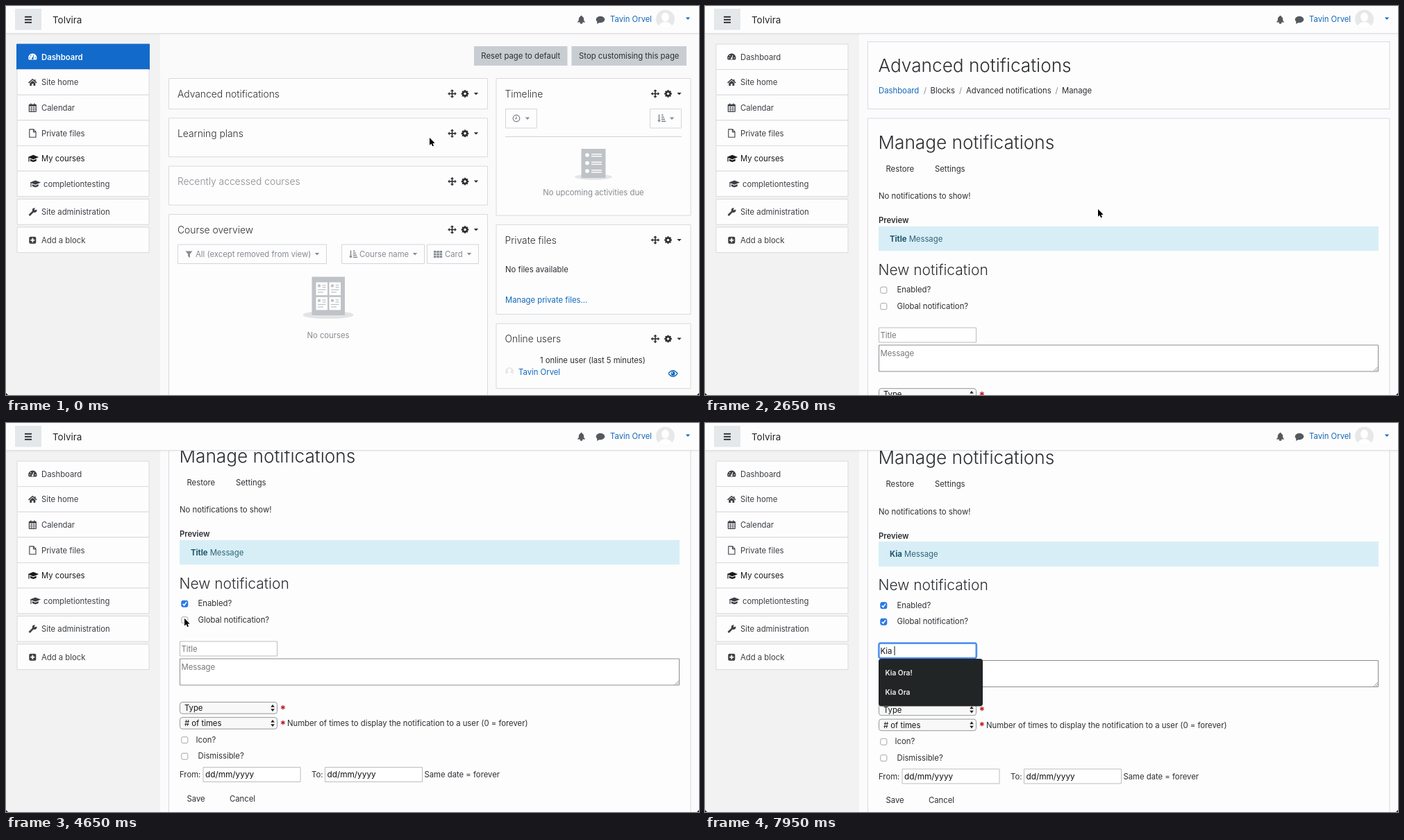
Write an HTML page with a canvas that moves like this. It is 998x561 px and loops after 8000 ms.

```html
<!DOCTYPE html>
<html lang="en">
<head>
<meta charset="utf-8">
<title>Manage notifications</title>
<style>
html, body { margin: 0; width: 100%; height: 100%; overflow: hidden; background: #fbfbfd; }
canvas { display: block; width: 998px; height: 561px; }
</style>
</head>
<body>
<canvas id="stage"></canvas>
<script>
const W = 998, H = 561, LOOP = 8000;
const canvas = document.getElementById('stage');
const g = canvas.getContext('2d');
const ratio = window.devicePixelRatio || 1;
canvas.width = W * ratio;
canvas.height = H * ratio;

const INK = '#2b2e31', GREY = '#868b90', BLUE = '#1268b8', LINE = '#d9dadd';
const CARD = '#fdfdfe', PAGE = '#fafafb';
const BODY = 11.3, HEAD = 13.85, SUB = 21, TITLE = 26.2;
const SITE = 'Tolvira', USER = 'Tavin Orvel';

// ---- drawing helpers ----
function text(s, x, y, color = INK, size = BODY, weight = 400, align = 'left') {
  g.font = `${weight} ${size}px Inter, "Open Sans", sans-serif`;
  g.textAlign = align;
  g.fillStyle = color;
  g.fillText(s, x, y + size * 0.36);
  return g.measureText(s).width;
}
function rect(x, y, w, h, color) {
  g.fillStyle = color;
  g.fillRect(x, y, w, h);
}
function box(x, y, w, h, fill, stroke, r = 0, lw = 1) {
  g.beginPath();
  g.roundRect(x, y, w, h, r);
  if (fill) { g.fillStyle = fill; g.fill(); }
  if (stroke) { g.strokeStyle = stroke; g.lineWidth = lw; g.stroke(); }
}
function trace(x, y, pts) {
  g.beginPath();
  for (let i = 0; i < pts.length; i += 2) g.lineTo(x + pts[i], y + pts[i + 1]);
}
function poly(x, y, color, ...pts) {
  trace(x, y, pts);
  g.fillStyle = color;
  g.fill();
}
function path(x, y, color, lw, ...pts) {
  trace(x, y, pts);
  g.strokeStyle = color;
  g.lineWidth = lw;
  g.stroke();
}
function oval(x, y, rx, ry, color) {
  g.beginPath();
  g.ellipse(x, y, rx, ry, 0, 0, 7);
  g.fillStyle = color;
  g.fill();
}
function ring(x, y, r, color, lw) {
  g.beginPath();
  g.arc(x, y, r, 0, 7);
  g.strokeStyle = color;
  g.lineWidth = lw;
  g.stroke();
}
function clipped(x, y, w, h, draw) {
  g.save();
  g.beginPath();
  g.rect(x, y, w, h);
  g.clip();
  draw();
  g.restore();
}
function focusRing(x, y, w, h, fill) {
  box(x, y, w, h, fill, '#a9cbfa', 3, 3.2);
  box(x, y, w, h, null, '#3f86ee', 2, 1.8);
}

// ---- timing helpers ----
const ease = k => k * k * (3 - 2 * k);
function track(keys, t) {
  if (t <= keys[0][0]) return keys[0].slice(1);
  for (let i = 1; i < keys.length; i++) {
    const a = keys[i - 1], b = keys[i];
    if (t < b[0]) {
      const k = ease((t - a[0]) / (b[0] - a[0]));
      return a.slice(1).map((v, j) => v + (b[j + 1] - v) * k);
    }
  }
  return keys[keys.length - 1].slice(1);
}
const between = (t, a, b) => t >= a && t < b;

const LOAD = 1650, CHECK_1 = 4300, CHECK_2 = 4850, FOCUS = 5500;
const KEYS = [6900, 7150, 7400, 7700], TYPED = 'Kia ';
const POINTER = [
  [0, 610, 190], [550, 661, 128], [900, 661, 128], [1300, 567, 151], [1500, 567, 151],
  [2100, 555, 177.5], [2600, 566, 293], [3400, 567, 293], [3650, 342, 281],
  [4150, 257, 261], [4450, 257, 261], [4700, 257, 284], [5000, 257, 284], [5400, 304, 324]
];
const SCROLL = [[2700, 0], [3100, 68.5], [3500, 147], [3650, 147.5], [4000, 149], [5900, 149], [6200, 146.5]];

// ---- icons, centred on x, y ----
const caret = (x, y, c = INK) => poly(x, y, c, -3.2, -1.6, 3.2, -1.6, 0, 1.7);
function moveIcon(x, y) {
  path(x, y, INK, 1.6, -4, 0, 4, 0);
  path(x, y, INK, 1.6, 0, -4, 0, 4);
  for (const [a, b] of [[1, 0], [-1, 0], [0, 1], [0, -1]])
    poly(x, y, INK, a * 6.3, b * 6.3, a * 3.6 + b * 2.6, b * 3.6 + a * 2.6, a * 3.6 - b * 2.6, b * 3.6 - a * 2.6);
}
function gear(x, y) {
  for (let i = 0; i < 4; i++) {
    const a = i * Math.PI / 4, c = Math.cos(a) * 5.3, s = Math.sin(a) * 5.3;
    path(x, y, INK, 2.4, -c, -s, c, s);
  }
  oval(x, y, 4.1, 4.1, INK);
  oval(x, y, 1.8, 1.8, CARD);
}
function tools(x, y) {
  moveIcon(x, y);
  gear(x + 18.5, y);
  caret(x + 34.5, y);
}
function sortIcon(x, y) {
  path(x, y, GREY, 1.5, -3.5, -5.5, -3.5, 4);
  poly(x, y, GREY, -6, 2.5, -1, 2.5, -3.5, 5.8);
  [2.5, 3.8, 5, 6.2].forEach((w, i) => rect(x, y - 5.5 + i * 3, w, 1.6, GREY));
}
function clockIcon(x, y) {
  ring(x, y, 4.7, GREY, 1.4);
  path(x, y, GREY, 1.2, 0, -2.8, 0, 0.6, -2, 0.6);
}
function gridIcon(x, y) {
  for (let i = 0; i < 9; i++) rect(x - 6 + i % 3 * 4.3, y - 5 + Math.floor(i / 3) * 3.6, 3.5, 2.8, GREY);
}
function avatar(x, y, r) {
  oval(x, y, r, r, '#e7e8ea');
  g.save();
  g.beginPath();
  g.arc(x, y, r, 0, 7);
  g.clip();
  oval(x, y - r * 0.22, r * 0.4, r * 0.48, '#fff');
  oval(x, y + r * 0.9, r * 0.75, r * 0.6, '#fff');
  g.restore();
}
function eye(x, y) {
  g.beginPath();
  g.moveTo(x - 6.5, y);
  g.quadraticCurveTo(x, y - 8.5, x + 6.5, y);
  g.quadraticCurveTo(x, y + 8.5, x - 6.5, y);
  g.strokeStyle = BLUE;
  g.lineWidth = 1.3;
  g.stroke();
  oval(x, y, 2.9, 2.9, BLUE);
  oval(x - 1, y - 1, 0.9, 0.9, '#fff');
}
const navIcons = {
  dash(x, y, c, bg) {
    g.beginPath();
    g.arc(x, y + 1, 6.2, Math.PI * 0.85, Math.PI * 2.15);
    g.closePath();
    g.fillStyle = c;
    g.fill();
    path(x, y, bg, 1.1, 0, 2.5, 1.6, -2.5);
    oval(x, y + 2, 1.4, 1.4, bg);
    for (const [a, b] of [[-4, 1], [-2.6, -2], [4, 1]]) oval(x + a, y + b, 0.8, 0.8, bg);
  },
  home(x, y, c) {
    path(x, y, c, 1.4, -5.8, 0.6, 0, -4.5, 5.8, 0.6);
    poly(x, y, c, -4, 0.8, 0, -2.6, 4, 0.8, 4, 4.7, 1.2, 4.7, 1.2, 1.6, -1.2, 1.6, -1.2, 4.7, -4, 4.7);
    rect(x + 2.8, y - 4.4, 1.4, 3, c);
  },
  cal(x, y, c) {
    box(x - 5, y - 4.5, 10, 10, null, c, 0.5, 1.1);
    rect(x - 5, y - 4.5, 10, 2.2, c);
    for (const d of [-1.7, 1.7]) path(x, y, c, 0.7, d, -2, d, 5.5);
    for (const d of [0.2, 2.8]) path(x, y, c, 0.7, -5, d, 5, d);
    rect(x - 3.3, y - 6.3, 1.6, 2.6, c);
    rect(x + 1.7, y - 6.3, 1.6, 2.6, c);
  },
  file(x, y, c) {
    path(x, y, c, 1.1, -4.5, -5.7, 1.3, -5.7, 4.7, -2.2, 4.7, 5.7, -4.5, 5.7, -4.5, -6.2);
    path(x, y, c, 1.1, 1.2, -5.7, 1.2, -2, 4.7, -2);
  },
  cap(x, y, c) {
    poly(x, y, c, -6.8, -2.2, 1, -5.4, 8.8, -2.2, 1, 1);
    poly(x, y, c, -3.4, 0.3, 1, 2.2, 5.4, 0.3, 5.4, 3.2, 1, 4.8, -3.4, 3.2);
    path(x, y, c, 1.2, -5.3, -2, -5.3, 4.2);
  },
  wrench(x, y, c, bg) {
    path(x, y, c, 2.6, -4.8, 4.8, 2, -2);
    oval(x + 2.8, y - 2.6, 3.3, 3.3, c);
    poly(x, y, bg, 2.2, -2.8, 4, -7, 7.2, -4);
  },
  plus(x, y, c, bg) {
    box(x - 5, y - 5, 10, 10, c, null, 2);
    path(x, y, bg, 1.8, -3, 0, 3, 0);
    path(x, y, bg, 1.8, 0, -3, 0, 3);
  }
};

// ---- page frame ----
const NAV = [
  ['Dashboard', 'dash', 55], ['Site home', 'home', 91.6], ['Calendar', 'cal', 128.2],
  ['Private files', 'file', 164.9], ['My courses', 'cap', 201.5], ['completiontesting', 'cap', 238.1],
  ['Site administration', 'wrench', 278.5], ['Add a block', 'plus', 319]
];
function drawer(active) {
  rect(0, 40, 222, H - 40, '#f2f2f2');
  NAV.forEach(([label, icon, y], i) => {
    const on = active && i === 0, bg = on ? '#126acb' : CARD;
    const dx = i === 5 ? 3 : 0, c = on ? '#fff' : i === 4 ? '#17191b' : '#3b3f43';
    box(on ? 15.5 : 16, y, on ? 191 : 190, 36.6, bg, on ? bg : LINE);
    navIcons[icon](38.3 + dx, y + 18.7, c, bg);
    text(label, 51 + dx, y + 18.6, c, BODY, on ? 600 : 400);
  });
}
function topBar() {
  rect(0, 0, W, 39, CARD);
  rect(0, 39, W, 1, '#dcdcde');
  rect(0, 40, W, 2, 'rgba(0,0,0,.025)');
  rect(13, 4, 38, 30.5, '#e4e8eb');
  for (const y of [15, 19, 23]) rect(27, y - 0.2, 10, 1.8, '#1f2224');
  text(SITE, 67, 20, '#1f2224', 13.4);
  const c = '#55595d';
  poly(828.5, 19.5, c, -5.8, 4, -3.8, 1.5, -3.4, -2.5, -1, -5, 0, -6, 1, -5, 3.4, -2.5, 3.8, 1.5, 5.8, 4);
  oval(828.5, 24.2, 1.8, 1.6, c);
  oval(856, 19.5, 6.3, 4.7, c);
  poly(856, 19.5, c, -4.5, 2, -5, 6.3, 0, 4);
  text(USER, 870, 19, BLUE);
  avatar(949.5, 19, 13.5);
  caret(982, 18, BLUE);
}

// ---- dashboard ----
function card(x, y, w, h, title, color) {
  box(x, y, w, h, CARD, LINE);
  text(title, x + 12.5, y + 22.2, color || INK, HEAD, 300);
  tools(x + w - 51, y + 22);
}
function outline(x, y, w, h = 27.5) {
  box(x, y, w, h, CARD, '#d3d6d9');
  caret(x + w - 13.5, y + 13.7, GREY);
}
function dashboard(focused) {
  for (const [s, x, w] of [['Reset page to default', 674, 134.5], ['Stop customising this page', 814.5, 165.5]]) {
    rect(x, 58, w, 28, '#c8cdd2');
    text(s, x + w / 2, 72, INK, BODY, 400, 'center');
  }
  card(234.5, 104.5, 459, 44, 'Advanced notifications');
  card(234.5, 161.8, 459, 55.8, 'Learning plans');
  card(234.5, 231, 459, 56, 'Recently accessed courses', '#878b8f');
  card(234.5, 300.5, 459, 270, 'Course overview');
  card(706, 104.5, 280, 197.5, 'Timeline');
  card(706, 315.5, 280, 129, 'Private files');
  card(706, 458, 280, 93.5, 'Online users');
  if (focused) {
    focusRing(653.8, 117.8, 29, 17.4, CARD);
    gear(661, 126.5);
    caret(677, 126.5);
  }

  outline(719.5, 148.5, 45);
  clockIcon(735, 162);
  outline(927.5, 148.5, 45);
  sortIcon(944, 162);
  rect(719, 188, 254, 1, '#d2d3d5');
  oval(846, 246.5, 27, 4.2, '#e4e5e7');
  rect(828.5, 206, 35, 42, '#bfc3c7');
  for (let i = 0; i < 3; i++) {
    oval(837, 215 + i * 11.5, 2.8, 2.8, '#fff');
    rect(843, 213 + i * 11.5, 15, 1.4, '#fff');
    rect(843, 216 + i * 11.5, 15, 1.4, '#fff');
  }
  text('No upcoming activities due', 846, 269, GREY, BODY, 400, 'center');
  text('No files available', 719, 380);
  text('Manage private files...', 719, 424, BLUE);
  text('1 online user (last 5 minutes)', 769, 510.5);
  avatar(725, 527, 6);
  text(USER, 738, 527.5, BLUE);
  eye(960.5, 530);

  outline(247.5, 344, 214);
  poly(263.5, 358, GREY, -5, -4.5, 5, -4.5, 1.4, -0.3, 1.4, 5, -1.4, 3, -1.4, -0.3);
  text('All (except removed from view)', 273, 358, GREY);
  outline(483.5, 344, 119);
  sortIcon(500, 358);
  text('Course name', 509, 358, GREY);
  outline(606.5, 344, 74);
  gridIcon(622, 358);
  text('Card', 632, 358, GREY);
  oval(464, 445.5, 36.5, 5.6, '#e2e3e5');
  rect(440.5, 390.5, 47.5, 55.5, '#bfc3c7');
  for (const x of [446.5, 465.5]) for (const y of [398.5, 419.8]) {
    rect(x, y, 16.5, 18.6, '#fff');
    oval(x + 4.5, y + 5, 2.2, 2.2, '#bfc3c7');
    rect(x + 9, y + 3.5, 5, 1.3, '#bfc3c7');
    rect(x + 9, y + 6.5, 5, 1.3, '#bfc3c7');
    rect(x + 2.5, y + 10, 11.5, 1.3, '#bfc3c7');
    rect(x + 2.5, y + 13.5, 8, 1.3, '#bfc3c7');
  }
  text('No courses', 464, 474.5, GREY, BODY, 400, 'center');
}

// ---- notification form ----
function checkbox(y, on) {
  box(252.8, y - 4.3, 9, 9, on ? '#2878e4' : '#fff', on ? '#2878e4' : '#a4a5a7', 2);
  if (on) path(257.3, y, '#fff', 1.6, -2.6, 0.4, -0.7, 2.4, 2.7, -2.4);
}
function select(y, label) {
  box(250.5, y - 8.4, 140, 16.6, '#f8f8f9', '#98999b', 3.5);
  text(label, 257, y, '#111');
  poly(384, y, '#222', -2.8, -1.2, 2.8, -1.2, 0, -5);
  poly(384, y, '#222', -2.8, 1.2, 2.8, 1.2, 0, 5);
  text('*', 394.5, y + 2, '#c01820', 15.5, 700);
}
function form(t) {
  const scroll = track(SCROLL, t)[0];
  const slide = 0.5 - Math.cos(Math.PI * Math.min(1, Math.max(0, (t - 1925) / 400))) / 2;
  const typed = TYPED.slice(0, KEYS.filter(k => t >= k).length);
  const focused = t >= FOCUS;

  g.save();
  g.translate(0, -scroll);
  box(234.5, 51.5, 751.5, 97, CARD, LINE);
  text('Advanced notifications', 249.5, 86, INK, TITLE, 300);
  for (const [s, x, c] of [['Dashboard', 250, BLUE], ['/', 315, GREY], ['Blocks', 324.5], ['/', 366, GREY],
    ['Advanced notifications', 376], ['/', 504.5, GREY], ['Manage', 514]]) text(s, x, 121.5, c);
  box(234.5, 162, 751.5, 680, CARD, LINE);
  text('Manage notifications', 249.5, 196.5, INK, TITLE, 300);
  text('Restore', 260.5, 234.5);
  text('Settings', 331, 234.5);
  text('No notifications to show!', 250, 274);
  text('Preview', 250, 309, INK, BODY, 600);
  clipped(250, 317.5, 720, 36 * slide, () => {
    rect(250, 317.5, 720, 36, '#d8eef6');
    const w = text(typed.trim() || 'Title', 266, 335.8, '#1f566b', BODY, 700);
    text('Message', 266 + w + 3.1, 335.8, '#2f6478');
  });

  g.translate(0, -56 * (1 - slide));
  text('New notification', 249.5, 380, INK, SUB, 300);
  checkbox(409.5, t >= CHECK_1);
  text('Enabled?', 276.5, 409);
  checkbox(433, t >= CHECK_2);
  text('Global notification?', 276.5, 432.5);
  if (focused) focusRing(250.4, 464, 140.4, 21.6, '#fff');
  else box(250.5, 464, 140, 21, '#fff', '#bcbdbf');
  const wide = text(typed || 'Title', 252.5, 475, typed ? '#111' : '#757779');
  const since = t - Math.max(FOCUS, ...KEYS.filter(k => t >= k));
  if (focused && since % 1000 < 500) rect(252.5 + (typed ? wide : 0), 468.5, 1, 13, '#111');

  box(250.5, 489, 719, 38, '#fff', '#8b8d8f');
  text('Message', 252.5, 500.5, '#757779');
  path(969, 526.5, '#777', 0.8, -6, 0, 0, -6);
  path(969, 526.5, '#777', 0.8, -3, 0, 0, -3);
  select(560, 'Type');
  select(582, '# of times');
  text('Number of times to display the notification to a user (0 = forever)', 405, 582);
  checkbox(606, false);
  text('Icon?', 273.5, 605.5);
  checkbox(629.5, false);
  text('Dismissible?', 276.5, 629);
  for (const [s, x, at] of [['From:', 250, 284], ['To:', 440, 459.5]]) {
    text(s, x, 656);
    box(at, 645.5, 140, 21, '#fff', '#bcbdbf');
    text('dd/mm/yyyy', at + 3, 656, '#111', 11.8);
  }
  text('Same date = forever', 602.5, 656);
  text('Save', 260.5, 690.5);
  text('Cancel', 322, 690.5);

  if (typed) {
    box(250, 486.5, 150, 68.5, '#222526', null, 4);
    text('Kia Ora!', 259.5, 507, '#f2f2f2', 10.2, 600);
    text('Kia Ora', 259.5, 535, '#f2f2f2', 10.2, 600);
  }
  g.restore();

  if (between(t, 2700, 4150) || between(t, 5900, 6500)) box(991, 1 + scroll * 0.67, 5.5, 371.5, '#797b7d', null, 2.8);
}

// ---- overlays ----
function status(w, label) {
  box(-4, 545, w + 4, 20, '#35373a', '#4a4c4f', 3);
  text(label, 4, 553, '#c9cacc', 9.1);
}
function pointer(x, y) {
  const shape = [0, 0, 0, 10.8, 2.5, 8.6, 4.1, 12.3, 6, 11.5, 4.4, 8, 7.6, 7.8];
  g.lineJoin = 'round';
  path(x, y, '#fff', 1.8, ...shape, 0, 0);
  poly(x, y, '#000', ...shape);
  g.lineJoin = 'miter';
}
function textCursor(x, y) {
  path(x, y, '#222', 1.1, 0, -5, 0, 5);
  for (const d of [-1, 1]) path(x, y, '#222', 1.1, -2.6, 6 * d, 0, 5 * d, 2.6, 6 * d);
}

function draw(t) {
  g.setTransform(ratio, 0, 0, ratio, 0, 0);
  rect(0, 0, W, H, t < LOAD ? PAGE : '#fbfbfd');
  if (t < LOAD) dashboard(t >= 700);
  else form(t);
  drawer(t < LOAD);
  topBar();
  if (between(t, 500, LOAD)) status(138, 'localhost/tolviramoodle/my/#');
  if (between(t, LOAD, 2350)) status(331, 'Waiting for localhost...');
  const [x, y] = track(POINTER, t);
  if (t < 5300) pointer(x, y);
  else if (t < KEYS[0]) textCursor(x, y);
  poly(0, H, '#222', 0, -3, 0, 0, 3, 0);
  poly(W, H, '#222', 0, -3, 0, 0, -3, 0);
}

function tick() {
  draw(performance.now() % LOOP);
  requestAnimationFrame(tick);
}
tick();
</script>
</body>
</html>
```
